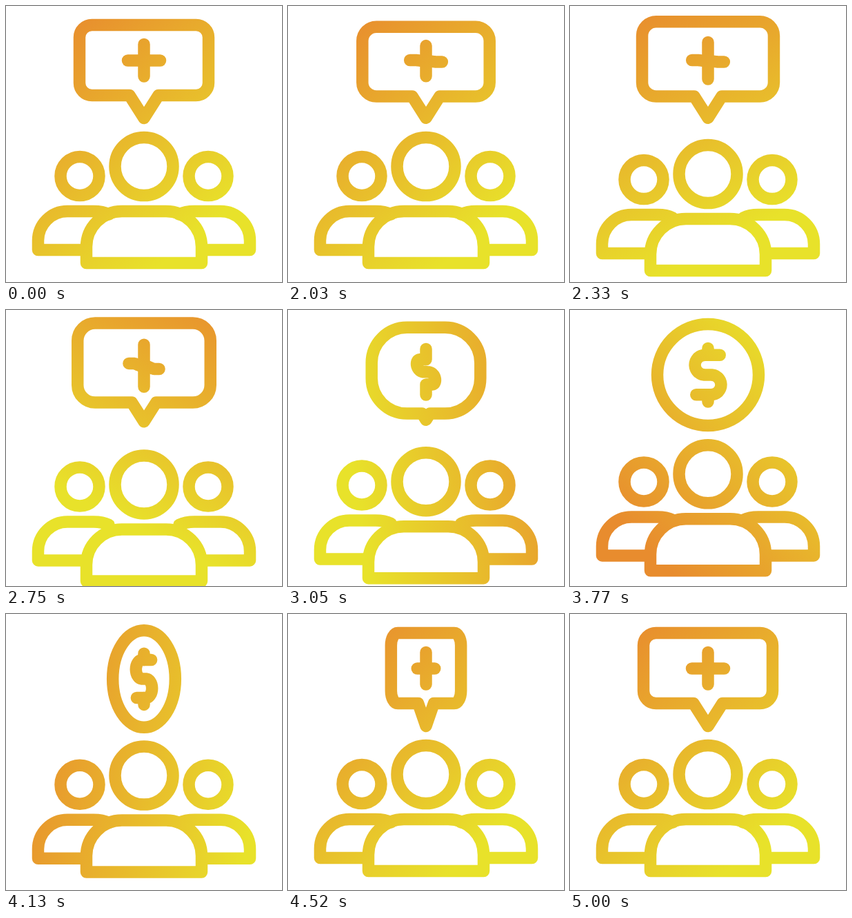
Recreate the animation shown at these times as an HTML page. Size 400 by 400 pixels, loop 5030 ms.

```html
<!DOCTYPE html>
<html lang="en">
<head>
<meta charset="utf-8">
<title>Group benefits</title>
<style>
  html, body { margin: 0; width: 100%; height: 100%; overflow: hidden; background: #fff; }
  svg { display: block; width: 100%; height: 100%; }
</style>
</head>
<body>
<svg viewBox="0 0 400 400">
  <defs>
    <linearGradient id="tint" gradientUnits="userSpaceOnUse">
      <stop offset="0" stop-color="#e88c2e"/>
      <stop offset="1" stop-color="#e8e22a"/>
    </linearGradient>
    <g id="member">
      <circle cx="107" cy="246.5" r="28"/>
      <path d="M116 353.5H46.5V340A42.5 42.5 0 0 1 89 297.5H127Q140 297.5 149 302"/>
    </g>
    <mask id="lines" maskUnits="userSpaceOnUse" x="0" y="0" width="400" height="400">
      <g fill="none" stroke="#fff" stroke-width="17.5" stroke-linecap="round" stroke-linejoin="round">
        <path id="frame"/>
        <path id="bars"/>
        <path id="curl"/>
        <g id="sides">
          <use href="#member"/>
          <use href="#member" transform="matrix(-1 0 0 1 400 0)"/>
        </g>
        <g id="leader">
          <circle cx="200" cy="232.5" r="42"/>
          <path d="M116.5 372.5V349A51.5 51.5 0 0 1 168 297.5H232A51.5 51.5 0 0 1 283.5 349V372.5Z"/>
        </g>
      </g>
    </mask>
  </defs>
  <rect width="400" height="400" fill="url(#tint)" mask="url(#lines)"/>
</svg>
<script>
const LOOP = 5030, START = 2030, STEP = 30;
const $ = id => document.getElementById(id);
const lerp = (a, b, k) => a + (b - a) * k;
const ramp = (t, from, to) => Math.min(1, Math.max(0, (t - from) / (to - from)));
const smooth = u => u * u * (3 - 2 * u);
const ease = (t, from, to) => smooth(ramp(t, from, to));

function poseAt(t) {
  const moving = t >= START ? 1 : 0;
  const flip = Math.cos(Math.PI * ramp(t, 3863, 4826));
  const swell = 1 + .148 * ease(t, 3410, 3680) * (1 - ease(t, 3900, 4500));
  return {
    drop: 21.5 * ease(t, START, 2620) * (1 - smooth(ramp(t, 2620, 4550) ** .75)),
    morph: flip < 0 ? 0 : moving * lerp(.05, 1, ease(t, 2600, 3300)),
    stretch: moving * lerp(-.33, 1.22, ease(t, START, 2560)) * (1 - ease(t, 2600, 3400)),
    scaleX: swell * Math.max(.005, Math.abs(flip)),
    scaleY: swell,
    turn: 2 * Math.PI * ease(t, START, 4650)
  };
}

// Point of the dollar's S at distance s from its middle, relative to that middle.
const RADIUS = 12.5, FLAT = 4, BEND = Math.PI * RADIUS, HALF = FLAT + BEND + 19;
function curlPoint(s) {
  const d = Math.abs(s), a = ramp(d, FLAT, FLAT + BEND) * Math.PI;
  const x = Math.min(d, FLAT) + RADIUS * Math.sin(a) - Math.max(0, d - FLAT - BEND);
  const y = RADIUS * (1 - Math.cos(a));
  return [Math.sign(s) * x, Math.sign(s) * y];
}

function drawEmblem({ morph: m, stretch: k, scaleX, scaleY }) {
  const at = (x, y) => `${200 + (x - 200) * scaleX} ${94 + (y - 94) * scaleY} `;
  const late = m ** 1.8;
  const w = lerp(93.5, 64, late) + 3.5 * k, r = lerp(18, 64, m);
  const top = lerp(27.5, 30, m) - 8 * k, bottom = lerp(129.5, 158, m);
  const tail = lerp(21, 0, m), tip = lerp(162.5, 158, m);
  const left = 200 - w, right = 200 + w;
  const round = Math.min(r, w);
  const arc = (x, y) => `A${round * scaleX} ${round * scaleY} 0 0 1 ` + at(x, y);

  $('frame').setAttribute('d',
    'M' + at(left + round, top) + 'L' + at(right - round, top) + arc(right, top + round) +
    'L' + at(right, bottom - round) + arc(right - round, bottom) +
    'L' + at(200 + tail, bottom) + 'L' + at(200, tip) + 'L' + at(200 - tail, bottom) +
    'L' + at(left + round, bottom) + arc(left, bottom - round) +
    'L' + at(left, top + round) + arc(left + round, top) + 'Z');

  $('bars').setAttribute('d',
    'M' + at(200, lerp(55.5, 60.5, m) - 5.5 * k) + 'L' + at(200, lerp(79, 69, m)) +
    'M' + at(200, lerp(79, 119, m)) + 'L' + at(200, lerp(102, 128, m) + 4.5 * k));

  // The plus bar is the same line as the S, laid flat.
  let d = '';
  for (let i = -24; i <= 24; i++) {
    const [x, y] = curlPoint(HALF * i / 24);
    d += (d ? 'L' : 'M') + at(200 + lerp(23.5 * i / 24, x, late), lerp(79, 94 + y, m));
  }
  $('curl').setAttribute('d', d);
}

function drawTint(turn) {
  const angle = turn + 50 * Math.PI / 180, half = 180;
  const middle = -30 - 45 * Math.sin(turn);
  [middle - half, middle + half].forEach((d, i) => {
    $('tint').setAttribute('x' + (i + 1), 200 + d * Math.cos(angle));
    $('tint').setAttribute('y' + (i + 1), 200 + d * Math.sin(angle));
  });
}

function render(ms) {
  const t = START + Math.floor((ms % LOOP - START) / STEP) * STEP;
  const pose = poseAt(t);
  drawEmblem(pose);
  drawTint(pose.turn);
  $('leader').setAttribute('transform', `translate(0 ${pose.drop})`);
  $('sides').setAttribute('transform', `translate(0 ${pose.drop * .46})`);
}

const begin = performance.now();
function tick() {
  render(performance.now() - begin);
  requestAnimationFrame(tick);
}
tick();
</script>
</body>
</html>
```
